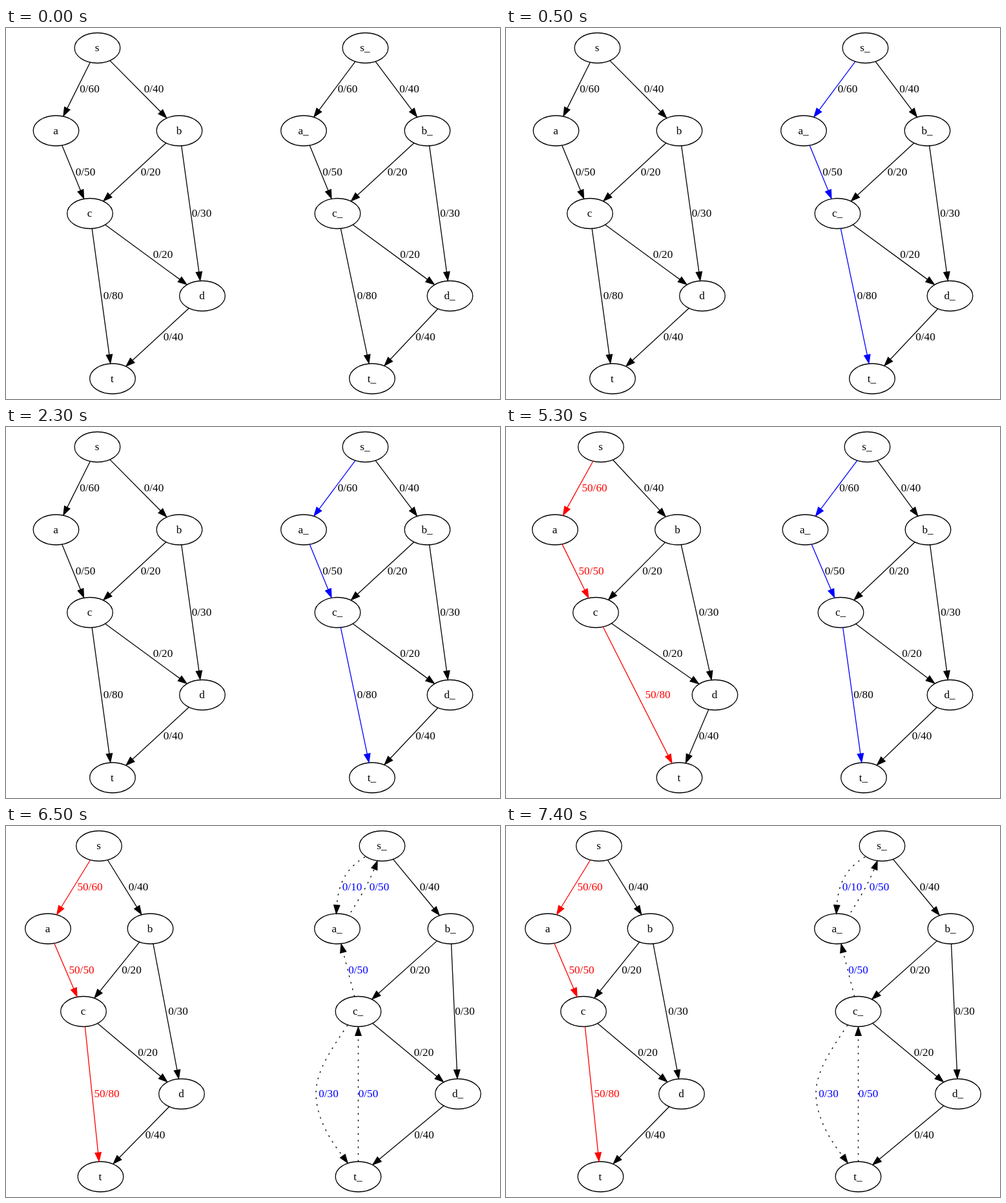
An HTML page that plays this animation: 765 px wide and 576 px high, repeating every 8000 ms.

```html
<!DOCTYPE html>
<html lang="en">
<head>
<meta charset="utf-8">
<title>Flow network and its residual graph</title>
<style>
  html, body { margin: 0; width: 100%; height: 100%; overflow: hidden; background: #fff; }
  svg { display: block; width: 100vw; height: 100vh; }
  text { font: 17.2px "Liberation Serif", "Times New Roman", serif; text-anchor: middle; }
  ellipse, path { fill: none; stroke-width: 1.3; }
  ellipse { stroke: #000; }
  .dotted { stroke-dasharray: 2.6 7.8; }
</style>
</head>
<body>
<svg id="stage" viewBox="0 0 765 576"></svg>
<script>
const RX = 35.3, RY = 23.5, HEAD = 13, HALF = 4.6;
const ROW = { s: 31, a: 159.5, b: 159.5, c: 288, d: 416, t: 544.5 };
const EDGES = ['sa', 'sb', 'ac', 'bc', 'bd', 'cd', 'ct', 'dt'];
const CAPACITY = { sa: 60, sb: 40, ac: 50, bc: 20, bd: 30, cd: 20, ct: 80, dt: 40 };
const LABEL_Y = { sa: 94, sb: 94, ac: 223, bc: 223, bd: 287, cd: 351, ct: 415, dt: 479 };
const ROUTE = ['sa', 'ac', 'ct'];
const RED = '#f00', BLUE = '#00f', BLACK = '#000';
const stage = document.getElementById('stage');

function add(parent, tag, attrs, text) {
  const el = document.createElementNS('http://www.w3.org/2000/svg', tag);
  for (const k in attrs) el.setAttribute(k, attrs[k]);
  if (text) el.textContent = text;
  parent.append(el);
  return el;
}

function label(g, x, y, text, color = BLACK) {
  add(g, 'text', { x, y: y + 5.6, fill: color }, text);
}

// Arrowhead ending at (x, y), pointing along the unit vector (ux, uy)
function head(g, x, y, ux, uy, color) {
  const bx = x - ux * HEAD, by = y - uy * HEAD;
  const d = `M${x} ${y}L${bx - uy * HALF} ${by + ux * HALF}L${bx + uy * HALF} ${by - ux * HALF}Z`;
  add(g, 'path', { d, style: `fill:${color}`, stroke: color, 'stroke-width': 1 });
}

// Straight arrow between two node centres, clipped to their ellipses
function arrow(g, [x1, y1], [x2, y2], color, dotted) {
  const dx = x2 - x1, dy = y2 - y1, len = Math.hypot(dx, dy);
  const ux = dx / len, uy = dy / len;
  const r = 1 / Math.hypot(ux / RX, uy / RY);
  const ex = x2 - ux * (r + 0.8), ey = y2 - uy * (r + 0.8);
  const d = `M${x1 + ux * r} ${y1 + uy * r}L${ex - ux * HEAD} ${ey - uy * HEAD}`;
  add(g, 'path', { d, stroke: color, class: dotted ? 'dotted' : '' });
  head(g, ex, ey, ux, uy, color);
}

function bend(g, d, [bx, by], [x, y]) {
  const len = Math.hypot(x - bx, y - by);
  add(g, 'path', { d: d + ` ${bx} ${by}`, stroke: BLACK, class: 'dotted' });
  head(g, x, y, (x - bx) / len, (y - by) / len, BLACK);
}

// xs: node centres in the order s a b c d t; labels: one x per edge, null to skip the edge
function graph(xs, labels, { suffix = '', color = BLACK, flow = 0 } = {}) {
  const g = add(stage, 'g', {});
  const pos = {};
  Object.keys(ROW).forEach((n, i) => {
    pos[n] = [xs[i], ROW[n]];
    add(g, 'ellipse', { cx: xs[i], cy: ROW[n], rx: RX, ry: RY });
    label(g, xs[i] - 0.5, ROW[n] - 0.4, n + suffix);
  });
  EDGES.forEach((e, i) => {
    if (labels[i] === null) return;
    const used = ROUTE.includes(e), tint = used ? color : BLACK;
    arrow(g, pos[e[0]], pos[e[1]], tint);
    label(g, labels[i], LABEL_Y[e], `${used ? flow : 0}/${CAPACITY[e]}`, flow ? tint : BLACK);
  });
  g.pos = pos;
  return g;
}

const startL = [[141.5, 77.5, 268.5, 130, 304, 165], [129.5, 229, 123, 224, 303, 243, 166, 259]];
const startR = [[556.5, 461, 652.5, 513.5, 687.5, 567], [529, 624.5, 505.5, 606, 687.5, 625.5, 559, 649.5]];
const flowL = [[147, 76, 266, 139, 323.5, 268.5], [137, 229, 132, 226.5, 314, 258, 235, 314]];
const flowR = [[559.5, 463.5, 653.5, 518.5, 687.5, 554], [531.5, 627, 509, 608.5, 688.5, 628.5, 553.5, 644]];
const endL = [[144, 65, 223.5, 120, 272, 146.5], [130, 205, 117, 194.5, 266.5, 219.5, 156, 231]];
const endR = [[582.5, 513, 688.5, 545.5, 700, 545.5], [null, 656, null, 641, 710.5, 647, null, 647.5]];

const plain = { suffix: '_' };
const path = { suffix: '_', color: BLUE };
const pushed = { color: RED, flow: 50 };

function residual() {
  const g = graph(...endR, plain), p = g.pos;
  bend(g, 'M556 48C531 63 515 84', [512.3, 123], [511.5, 136]);
  bend(g, 'M534 134C545 116 559 94', [570.5, 66.5], [575, 54.5]);
  bend(g, 'M529 309C505 345 480 380 480 415C480 452 502 488', [521.5, 512.5], [529, 523]);
  arrow(g, p.c, p.a, BLACK, true);
  arrow(g, p.t, p.c, BLACK, true);
  label(g, 536, 94, '0/10', BLUE);
  label(g, 578, 94, '0/50', BLUE);
  label(g, 545.5, 223, '0/50', BLUE);
  label(g, 499.5, 415, '0/30', BLUE);
  label(g, 561, 415, '0/50', BLUE);
  return g;
}

const LOOP = 8000;
const scenes = [
  { g: graph(...startL), from: 0, to: 3500 },
  { g: graph(...startR, plain), from: 0, to: 500 },
  { g: graph(...startR, path), from: 500, to: 3500 },
  { g: graph(...flowL, pushed), from: 3500, to: 6500 },
  { g: graph(...flowR, path), from: 3500, to: 6500 },
  { g: graph(...endL, pushed), from: 6500, to: LOOP },
  { g: residual(), from: 6500, to: LOOP },
];

function draw(time) {
  const t = time % LOOP;
  for (const { g, from, to } of scenes) {
    g.style.display = t >= from && t < to ? '' : 'none';
  }
}

const begin = performance.now();
function tick() {
  draw(performance.now() - begin);
  requestAnimationFrame(tick);
}
tick();
</script>
</body>
</html>
```
